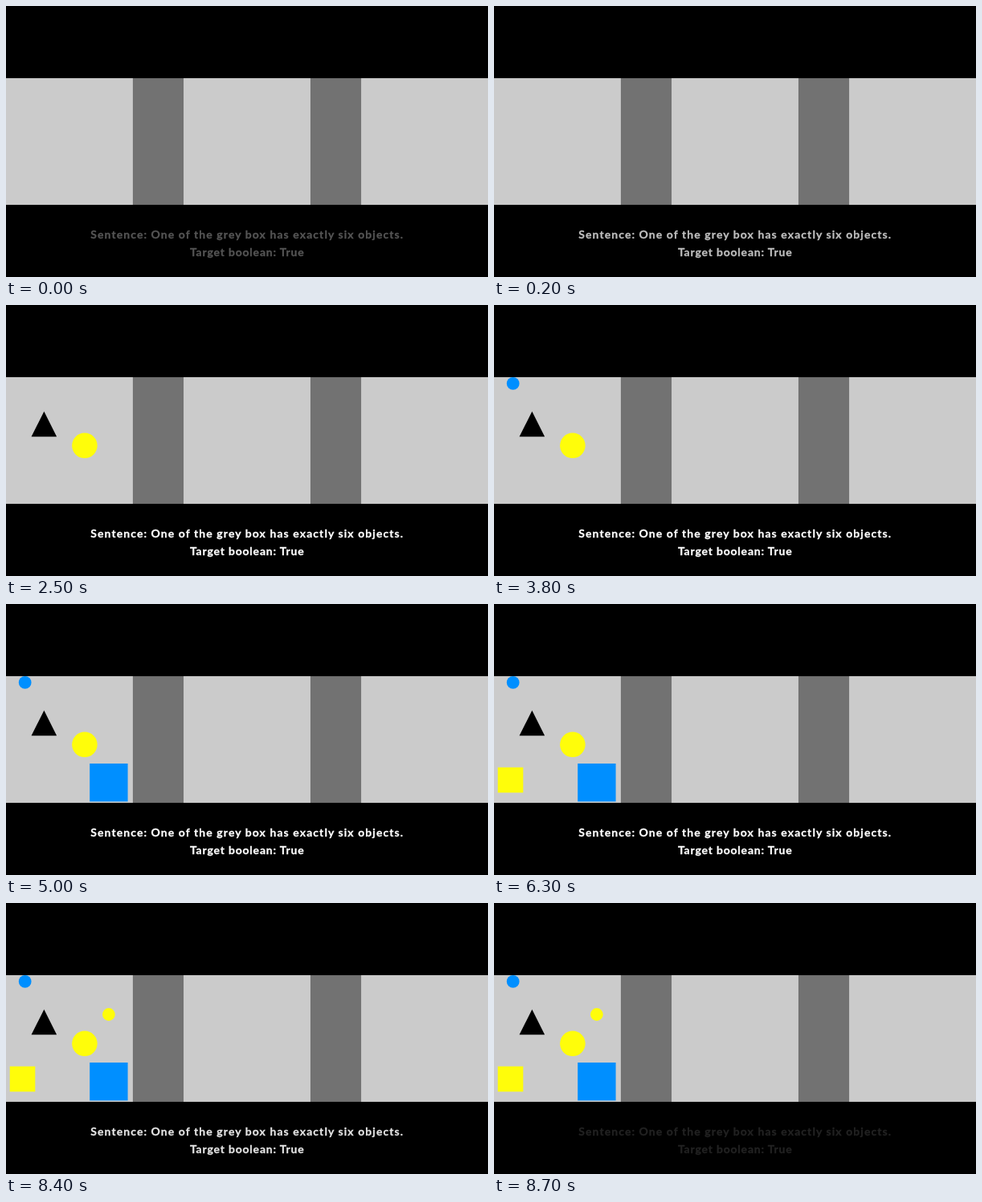
These frames come from a looping animation (600x338 px, 8800 ms). An HTML page:

```html
<!DOCTYPE html>
<html lang="en">
<head>
<meta charset="utf-8">
<title>Grey boxes</title>
<style>
  html, body { margin: 0; width: 100%; height: 100%; overflow: hidden; background: #000; }
  svg { display: block; width: 100%; height: 100%; }
  text {
    font: bold 14px Lato, "Open Sans", sans-serif;
    text-anchor: middle; fill: #fff; stroke: #fff; stroke-width: 0.3px;
  }
</style>
</head>
<body>
<svg viewBox="0 0 600 338">
  <rect width="600" height="338" fill="#000"/>
  <!-- The scene is 380 by 100 units: three boxes of 100 with gaps of 40 -->
  <g transform="translate(0 90.05) scale(1.57895)">
    <rect width="380" height="100" fill="#727272"/>
    <g fill="#cbcbcb">
      <rect width="100" height="100"/>
      <rect x="140" width="100" height="100"/>
      <rect x="280" width="100" height="100"/>
    </g>
    <path data-at="1300" d="M30 27L40 47H20Z" fill="#000"/>
    <circle data-at="2500" cx="62" cy="54" r="10" fill="#fffd0a"/>
    <circle data-at="3800" cx="15" cy="5" r="5" fill="#008fff"/>
    <rect data-at="5000" x="66" y="69" width="30" height="30" fill="#008fff"/>
    <rect data-at="6300" x="3" y="72" width="20" height="20" fill="#fffd0a"/>
    <circle data-at="7500" cx="81" cy="31" r="5" fill="#fffd0a"/>
  </g>
  <g id="caption">
    <text x="300.3" y="289.6" letter-spacing="1.07">Sentence: One of the grey box has exactly six objects.</text>
    <text x="300.2" y="311.6" letter-spacing="0.8">Target boolean: True</text>
  </g>
</svg>
<script>
const LOOP = 8800, STEP = 100;
const caption = document.getElementById("caption");
const shapes = [...document.querySelectorAll("[data-at]")];
const clamp = v => Math.max(0, Math.min(1, v));

function draw(time) {
  const t = Math.floor((time % LOOP) / STEP) * STEP;
  for (const shape of shapes) {
    shape.setAttribute("visibility", t >= +shape.dataset.at ? "visible" : "hidden");
  }
  const fadeIn = 0.33 + t * 0.0021;
  const fadeOut = 0.9 - (t - 8400) * 0.00257;
  caption.setAttribute("opacity", clamp(Math.min(fadeIn, t < 8400 ? 1 : fadeOut)));
}

const start = performance.now();
function tick() {
  draw(performance.now() - start);
  requestAnimationFrame(tick);
}
tick();
</script>
</body>
</html>
```
